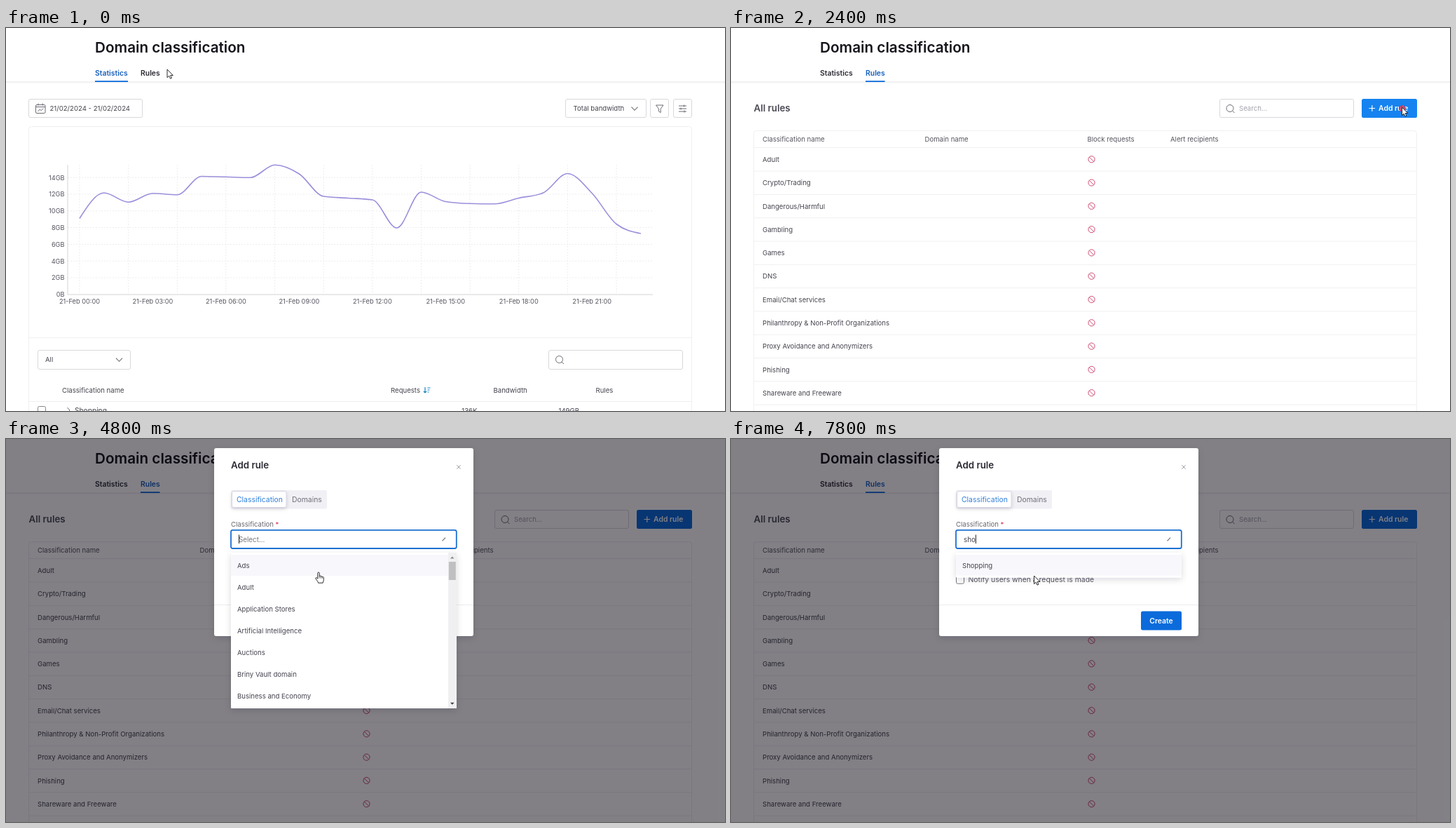
These frames come from a looping animation (1026 px wide and 546 px high, 8 s). An HTML page:

```html
<!DOCTYPE html>
<html lang="en">
<head>
<meta charset="utf-8">
<title>Domain classification</title>
<style>
html, body { margin: 0; width: 100%; height: 100%; overflow: hidden; background: #fff; }
svg { display: block; font-family: Inter, "Noto Sans", sans-serif; }
text { white-space: pre; }
</style>
</head>
<body>
<svg id="stage" width="1026" height="546" viewBox="0 0 1026 546"></svg>
<script>
const STEP = 200, LOOP = 8000;
const BLUE = '#0b6bdb', INK = '#44444e', EDGE = '#d9d9de', PALE = '#f0f0f3', ICON = '#6b6b75';
const stage = document.getElementById('stage');

function el(parent, tag, attrs = {}) {
  const node = document.createElementNS('http://www.w3.org/2000/svg', tag);
  for (const k in attrs) node.setAttribute(k, attrs[k]);
  parent.appendChild(node);
  return node;
}
const group = (p, attrs) => el(p, 'g', attrs);
const rect = (p, x, y, w, h, attrs) => el(p, 'rect', { x, y, width: w, height: h, fill: 'none', ...attrs });
const path = (p, d, stroke = ICON, attrs) => el(p, 'path', { d, stroke, fill: 'none', 'stroke-width': 1, ...attrs });
const box = (p, x, y, w, h, stroke = EDGE, rx = 2.5) => rect(p, x + .5, y + .5, w - 1, h - 1, { stroke, rx, fill: '#fff' });
const show = (node, on) => node.setAttribute('display', on ? 'inline' : 'none');

// cy is the middle of the capitals
function label(p, str, x, cy, size = 9.6, fill = INK, weight = 400, anchor = 'start') {
  const t = el(p, 'text', { x, y: cy + size * .36, 'font-size': size, fill, 'font-weight': weight, 'text-anchor': anchor });
  t.textContent = str;
  return t;
}
const chevron = (p, x, y, dir = 1) => path(p, `M${x - 4.5} ${y - 2.3 * dir}l4.5 4.6 4.5 -4.6`.replace(/4\.6/g, m => m * dir), ICON, { 'stroke-width': 1.1 });
function lens(p, x, y) {
  el(p, 'circle', { cx: x - .5, cy: y - .5, r: 5, fill: 'none', stroke: ICON });
  path(p, `M${x + 3.2} ${y + 3.2}l2.8 2.8`);
}

// Shadows
const defs = el(stage, 'defs');
function shadow(id, dy, blur, alpha) {
  const f = el(defs, 'filter', { id, x: '-20%', y: '-30%', width: '140%', height: '170%' });
  el(f, 'feDropShadow', { dx: 0, dy, stdDeviation: blur, 'flood-color': '#1c1430', 'flood-opacity': alpha });
}
shadow('soft', 3, 5, .14);
shadow('low', 2, 2.5, .16);

// Header
rect(stage, 0, 0, 1026, 546, { fill: '#fff' });
const head = group(stage);
rect(head, 0, 76.5, 1026, 1, { fill: '#e3e3e7' });
rect(head, 0, 77.5, 1026, 1, { fill: '#f6f6f8' });
label(head, 'Domain classification', 127, 28, 20.7, '#15151c', 600);
const tabs = [label(head, 'Statistics', 127, 63.8, 10.4, INK, 600), label(head, 'Rules', 192, 63.8, 10.4, INK, 600)];
const tabLine = rect(head, 127, 75.2, 47, 1.8, { fill: BLUE });

// Statistics page
const stats = group(stage);
function buildToolbar() {
  box(stats, 32, 101, 163, 27);
  rect(stats, 42.5, 109.5, 13.5, 12, { stroke: ICON, rx: 1.5 });
  path(stats, 'M42.5 112.5h13.5M46 107.5v3M52.5 107.5v3M45.5 119l2.6-3 2.2 1.6 3-3.2');
  label(stats, '21/02/2024 - 21/02/2024', 62.5, 115);
  box(stats, 798, 101, 116, 27);
  label(stats, 'Total bandwidth', 809.5, 115);
  chevron(stats, 897, 115);
  box(stats, 919, 101, 27, 27);
  path(stats, 'M927.5 110h10.5l-3.8 5.2v5.3l-2.8-1.7v-3.6z');
  box(stats, 952, 101, 27, 27);
  path(stats, 'M960 111h11M960 115h11M960 119h11M967.5 109.5v3M963 113.5v3M968 117.5v3');
}

// Monotone cubic curve through the hourly points
function curve(xs, ys) {
  const n = xs.length, dx = xs[1] - xs[0];
  const slope = i => (ys[i + 1] - ys[i]) / dx;
  const tan = ys.map((_, i) => {
    if (i === 0 || i === n - 1) return null;
    const a = slope(i - 1), b = slope(i);
    return (Math.sign(a) + Math.sign(b)) * Math.min(Math.abs(a), Math.abs(b), Math.abs(a + b) / 4);
  });
  tan[0] = (3 * slope(0) - tan[1]) / 2;
  tan[n - 1] = (3 * slope(n - 2) - tan[n - 2]) / 2;
  let d = `M${xs[0]} ${ys[0]}`;
  for (let i = 1; i < n; i++) {
    const h = dx / 3;
    d += `C${xs[i - 1] + h} ${ys[i - 1] + h * tan[i - 1]} ${xs[i] - h} ${ys[i] - h * tan[i]} ${xs[i]} ${ys[i]}`;
  }
  return d;
}

function buildChart() {
  const hourX = h => 105 + h * 34.82, dash = { 'stroke-dasharray': '2 2' };
  rect(stats, 32.5, 140.5, 946, 420, { stroke: PALE, rx: 4 });
  path(stats, 'M33 441.5H978', PALE);
  for (let i = 0; i < 8; i++) {
    const y = 379.8 - i * 23.8;
    label(stats, i ? i * 2 + 'GB' : '0B', 83.5, y, 9.2, '#55555f', 400, 'end');
    if (i) path(stats, `M88 ${y}H922`, '#ededf0', dash);
  }
  for (let h = 0; h < 24; h += 2) path(stats, `M${hourX(h)} 195V380`, '#ededf0', dash);
  for (let h = 0; h < 24; h += 3)
    label(stats, `21-Feb ${String(h).padStart(2, '0')}:00`, hourX(h), 390, 9.2, '#55555f', 400, 'middle');
  path(stats, 'M88 195V380H923', '#d4d4d9');
  const ys = [271.5, 235, 248.2, 235.8, 237.8, 211.5, 212.3, 213.3, 195.2, 208, 240, 242.5,
    245, 285, 234, 247.5, 250.3, 250.8, 242.5, 235, 207.5, 235.5, 279.5, 293];
  path(stats, curve(ys.map((_, i) => hourX(i)), ys), '#9c8fdb', { 'stroke-width': 1.6 });
}

function buildTotals() {
  box(stats, 45, 459, 133, 28);
  label(stats, 'All', 56, 473);
  chevron(stats, 161.5, 473);
  box(stats, 774, 459, 192, 28);
  lens(stats, 790, 473);
  label(stats, 'Classification name', 80, 516.3);
  label(stats, 'Requests', 549, 516.3);
  path(stats, 'M598 512v8m-2.2-2.2l2.2 2.2 2.2-2.2M601.5 513h4M601.5 516h3M601.5 519h2', '#1787c4', { 'stroke-width': 1.2 });
  label(stats, 'Bandwidth', 695.5, 516.3);
  label(stats, 'Rules', 841.5, 516.3);
  path(stats, 'M33 532.5H978', PALE);
  rect(stats, 45.5, 539.5, 11, 11, { stroke: '#85858f', rx: 2 });
  path(stats, 'M87.5 541l3.5 4-3.5 4');
  label(stats, 'Shopping', 98, 545.5, 10.2);
  label(stats, '136K', 672.5, 545.5, 9.6, INK, 400, 'end');
  label(stats, '149GB', 818, 545.5, 9.6, INK, 400, 'end');
  label(stats, '-', 842, 545.5);
}
buildToolbar();
buildChart();
buildTotals();

// Rules page
const rules = group(stage);
label(rules, 'All rules', 32.5, 114.5, 13.3, '#4a4a54', 600);
const rulesLines = group(rules);
box(rulesLines, 697, 101, 192, 27);
lens(rules, 712.5, 115);
label(rules, 'Search...', 725, 115, 9.6, '#a3a3ac');
const addBtn = rect(rules, 900, 101, 79, 27, { rx: 2.5 });
path(rules, 'M910.5 114.5h8.6M914.8 110.2v8.6', '#fff', { 'stroke-width': 1.2 });
label(rules, 'Add rule', 924, 114.5, 10.4, '#fff', 600);
rect(rulesLines, 32.5, 146.5, 946, 420, { stroke: PALE, rx: 4 });
[['Classification name', 45], ['Domain name', 276.5], ['Block requests', 508.5], ['Alert recipients', 627]]
  .forEach(([s, x]) => label(rules, s, x, 158.7, 9.6, '#55555f'));
path(rulesLines, 'M33 170.5H978', PALE);
['Adult', 'Crypto/Trading', 'Dangerous/Harmful', 'Gambling', 'Games', 'DNS', 'Email/Chat services',
  'Philanthropy & Non-Profit Organizations', 'Proxy Avoidance and Anonymizers', 'Phishing', 'Shareware and Freeware']
  .forEach((name, i) => {
    const y = 187.5 + i * 33.3;
    label(rules, name, 45, y);
    el(rules, 'circle', { cx: 514.5, cy: y - .3, r: 4.6, fill: 'none', stroke: '#cf4a72' });
    path(rules, `M511.3 ${y - 3.5}l6.4 6.4`, '#cf4a72');
    path(rulesLines, `M33 ${y + 16.6}H978`, PALE);
  });

const veil = rect(stage, 0, 0, 1026, 546, { fill: 'rgba(6,3,12,.5)' });
const rippleLow = group(stage);

// Dialog
const modal = group(stage);
rect(modal, 297, 13, 370, 268, { fill: '#fff', rx: 3, filter: 'url(#soft)' });
label(modal, 'Add rule', 321, 37.5, 13.3, '#2b2b34', 600);
path(modal, 'M643.3 37.3l5.4 5.4m0-5.4l-5.4 5.4', '#a0a0a8');
rect(modal, 321, 73, 137, 26.5, { fill: '#f1f0f5', rx: 2.5 });
rect(modal, 322.5, 74.5, 77.5, 23, { fill: '#fff', stroke: '#d6d3e6', rx: 2.5, filter: 'url(#low)' });
label(modal, 'Classification', 329, 86, 10.4, '#2f7fdc');
label(modal, 'Domains', 408, 86, 10.4, '#6f6f7a');
label(modal, 'Classification', 321, 121.7, 9.6, '#66666f');
label(modal, '*', 384.5, 121.7, 9.6, '#d9304f');
const field = rect(modal, 321, 129.8, 321.8, 26.2, { rx: 2.5, fill: '#fff' });
const fieldText = label(modal, '', 332, 143, 9.8);
const caret = rect(modal, 332, 136.5, 1, 12.5, { fill: '#22222a' });
const arrowDown = chevron(modal, 627, 143), arrowUp = chevron(modal, 627, 143, -1);
['Block requests', 'Notify users when a request is made'].forEach((s, i) => {
  const y = 179.7 + i * 21;
  rect(modal, 321.5, y - 5.5, 11, 11, { stroke: '#77777f', rx: 2 });
  label(modal, s, 338.5, y, 10.4, '#55555f');
});
path(modal, 'M297 236.5H667', '#ececf0');
rect(modal, 585, 245.5, 58, 27, { fill: BLUE, rx: 2.5 });
label(modal, 'Create', 614, 259, 10.4, '#fff', 600, 'middle');

// Drop-down list
const ROW = 31.1;
const fullList = ['Ads', 'Adult', 'Application Stores', 'Artificial Intelligence', 'Auctions', 'Briny Vault domain', 'Business and Economy'];
const matches = {
  '': fullList,
  s: ['Ads', 'Application Stores', 'Artificial Intelligence', 'Auctions', 'Briny Vault domain', 'Business and Economy', 'Chat services'],
  sh: ['Phishing', 'Shareware and Freeware', 'Shopping'],
  sho: ['Shopping']
};
const menus = {}, hovers = {};
for (const key in matches) {
  const names = matches[key], long = names.length > 6, g = menus[key] = group(stage);
  rect(g, 321, 162, 322, long ? 222 : 4.5 + names.length * ROW, { fill: '#fff', rx: 1.5, filter: 'url(#soft)' });
  const wide = long ? 310 : 322;
  rect(g, 321, 165, wide, 29.5, { fill: '#f8f7fb' });
  hovers[key] = rect(g, 321, 165, wide, 30, { fill: '#f8f7fb' });
  names.forEach((s, i) => label(g, s, 330, 180.4 + i * ROW));
  if (!long) continue;
  rect(g, 631, 162, 12, 222, { fill: '#f0f0f2' });
  rect(g, 631.8, 175, 10, 26, { fill: '#c0c0c3' });
  path(g, 'M634 170.5l2.8-3 2.8 3z', 'none', { fill: '#88888c' });
  path(g, 'M634 375.8l2.8 3 2.8-3z', 'none', { fill: '#3c3c40' });
}

// Click ripple and pointers
const ripple = el(stage, 'circle', { 'stroke-dasharray': '3 2' });
const pointers = { arrow: group(stage), hand: group(stage), beam: group(stage) };
path(pointers.arrow, 'M0 0V11.6L2.7 9.2 4.5 13.2 6.4 12.3 4.7 8.5H8.3Z', '#16161a', { fill: '#fff', 'stroke-width': .9 });
path(pointers.hand, 'M-1.2 1.2C-1.2-.4 1.2-.4 1.2 1.2V5.6C1.5 4.6 3.3 4.8 3.4 6 3.8 5.2 5.4 5.5 5.4 6.7 5.9 6 7.3 6.4 7.3 7.6V10.8C7.3 12.6 6.3 13.2 6.2 15.2H-.4C-.6 13.2-3.4 10.6-4.2 8.8-4.5 7.6-3 7.2-2.3 8L-1.2 9.3Z',
  '#16161a', { fill: '#fff', 'stroke-width': .9 });
path(pointers.hand, 'M1.2 5.6V8.4M3.4 6V8.6M5.4 6.7V8.8', '#16161a', { 'stroke-width': .7 });
path(pointers.beam, 'M-2.5-6.2H-.6L0-5.6.6-6.2H2.5M0-5.6V5.6M-2.5 6.2H-.6L0 5.6.6 6.2H2.5', '#16161a');

// Pointer stops: time, shape, x, y
const track = [
  [0, 'arrow', 230, 59], [200, 'hand', 218, 64], [400, 'hand', 212, 65], [1200, 'hand', 216, 62],
  [1400, 'beam', 277.5, 40], [1600, 'arrow', 520, 24], [1800, 'arrow', 820, 68], [2000, 'arrow', 950, 108],
  [2200, 'arrow', 957.5, 113], [2600, 'arrow', 947.5, 133], [2800, 'arrow', 760, 158], [3000, 'arrow', 540, 150],
  [3200, 'beam', 462, 138], [4400, 'beam', 458, 146], [4600, 'hand', 452, 175], [4800, 'hand', 446, 190],
  [5000, 'hand', 441, 202], [5200, 'hand', 437, 210], [5400, 'hand', 434, 215], [5800, 'hand', 431, 220],
  [6000, 'hand', 428, 227], [6200, 'hand', 425, 234], [6400, 'hand', 423, 237], [7000, 'hand', 426, 225],
  [7200, 'hand', 430, 206], [7400, 'hand', 432.5, 195], [7800, 'arrow', 432.5, 195]
];
const clicks = [[1000, 212, 65], [2400, 958, 115], [3600, 461, 138]];
const rings = [[4.5, .75], [15, .4], [20.5, .13]];
const caretFlips = [3600, 4200, 4800, 5400, 5800, 6400, 7000];

function draw(time) {
  const t = Math.floor(time % LOOP / STEP) * STEP;
  const onRules = t >= 1200, dialog = t >= 2600, open = t >= 3600;
  const typed = 'sho'.slice(0, Math.max(0, (t - 7200) / STEP));

  tabs[0].setAttribute('fill', onRules ? '#2b2b34' : '#1760bd');
  tabs[1].setAttribute('fill', onRules || t >= 400 ? '#1760bd' : '#2b2b34');
  tabLine.setAttribute('x', onRules ? 192 : 127);
  tabLine.setAttribute('width', onRules ? 27.5 : 47);
  show(stats, !onRules);
  show(rules, onRules);
  rulesLines.setAttribute('opacity', t < 1600 ? .45 : 1);
  addBtn.setAttribute('fill', t >= 2000 && t < 2600 ? '#1683f0' : BLUE);

  show(veil, dialog);
  show(modal, dialog);
  modal.setAttribute('transform', `translate(0 ${t === 2600 ? -17 : 0})`);
  const focus = t >= 3800;
  field.setAttribute('stroke', focus ? '#1d70d2' : t >= 3200 ? '#8f8c9e' : EDGE);
  field.setAttribute('stroke-width', focus ? 1.8 : t >= 3200 ? 1.3 : 1);
  fieldText.textContent = typed || 'Select...';
  fieldText.setAttribute('fill', typed ? INK : '#77777f');
  show(arrowDown, !open);
  show(arrowUp, open);
  show(caret, caretFlips.filter(f => f <= t).length % 2);
  caret.setAttribute('x', 332 + (typed ? fieldText.getComputedTextLength() : 0));

  const [, shape, x, y] = track.filter(s => s[0] <= t).pop();
  for (const k in pointers) show(pointers[k], k === shape);
  pointers[shape].setAttribute('transform', `translate(${x} ${y})`);

  for (const k in menus) show(menus[k], open && k === typed);
  const row = Math.floor((y - 164.5) / ROW);
  show(hovers[typed], shape === 'hand' && row >= 0 && row < matches[typed].length);
  hovers[typed].setAttribute('y', 165 + row * ROW);

  const click = clicks.find(c => t >= c[0] && t < c[0] + 3 * STEP);
  show(ripple, click);
  if (click) {
    const [r, alpha] = rings[(t - click[0]) / STEP];
    const hue = r > 18 ? '#93306f' : '#d02a4c';
    const a = { cx: click[1], cy: click[2], r, fill: hue, stroke: hue, 'fill-opacity': alpha, 'stroke-opacity': Math.min(.8, alpha * 2) };
    for (const k in a) ripple.setAttribute(k, a[k]);
  }
}

let start;
function tick(now) {
  if (start === undefined) start = now;
  draw(now - start);
  requestAnimationFrame(tick);
}
draw(0);
requestAnimationFrame(tick);
</script>
</body>
</html>
```
